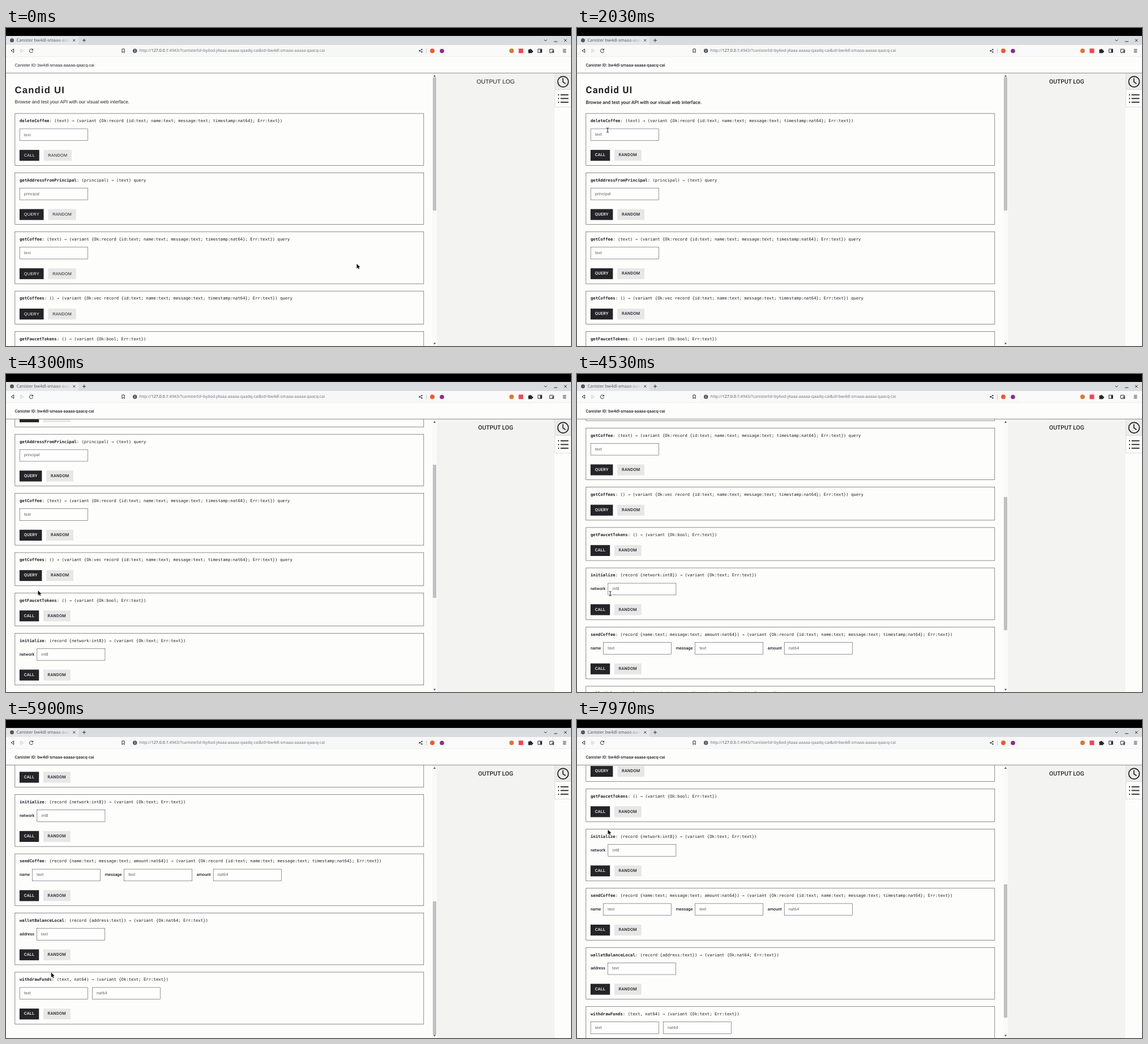
Write an HTML page that moves like this. It is 998 px wide and 561 px high and loops after 8 s.

```html
<!DOCTYPE html>
<html lang="en">
<head>
<meta charset="utf-8">
<title>Candid UI</title>
<style>
html, body { margin: 0; width: 100%; height: 100%; overflow: hidden; background: #fdfdfc; }
#stage { position: relative; width: 998px; height: 561px; overflow: hidden; background: #fdfdfc; text-rendering: geometricPrecision; }
#stage div, #stage svg, .t { position: absolute; box-sizing: border-box; }
.t { white-space: pre; }
.black { left: 0; top: 0; width: 998px; height: 14px; background: #000; }
.tabs { left: 0; top: 14px; width: 998px; height: 16px; background: #d9dcdf; }
.tab { left: 1px; top: 1px; width: 127px; height: 15px; background: #e4e6e8; border-radius: 2px 2px 0 0; }
.bar { left: 0; top: 30px; width: 998px; height: 21px; background: #fafafa; border-bottom: 1px solid #ececec; }
.field { left: 217px; top: 2px; width: 564px; height: 17px; background: #f6f7f7; border-radius: 2px; }
.chrome { font: 400 7.15px/12px "Noto Sans", sans-serif; color: #73757a; }
.chrome b { font-weight: 400; color: #4a4c50; }
.tabname { left: 18.5px; top: 15.5px; width: 96px; overflow: hidden; font-size: 7.5px; color: #5a5c60;
  -webkit-mask: linear-gradient(90deg, #000 72%, transparent); mask: linear-gradient(90deg, #000 72%, transparent); }

/* the web page is laid out on a 1920 x 1080 screen and scaled to the stage */
#web {
  --ui: "Liberation Sans", Arial, sans-serif;
  left: 0; top: 0; width: 1920px; height: 1080px;
  transform: scale(.51979, .51944); transform-origin: 0 0;
  color: #222126; font: 500 14px/20px var(--ui);
}
#web.loaded { --ui: Roboto, sans-serif; }
.head { left: 0; top: 98px; width: 1920px; height: 56px; background: #fdfdfc; border-bottom: 1px solid #29252a; }
#view { left: 0; top: 154px; width: 1449px; height: 926px; overflow: hidden; }
#page { left: 0; width: 1449px; height: 2040px; }
.title { left: 30px; top: 188px; font-weight: 700; font-size: 32px; line-height: 46px; letter-spacing: 2.3px; }
.sub { left: 30px; top: 243px; font-size: 16px; }
.panel { left: 30px; width: 1390px; border: 1px solid #29252a; }
.sig { left: 15px; top: 15px; font: 400 14px/20px "DejaVu Sans Mono", monospace; }
.input { top: 51px; width: 232px; height: 41px; border: 1px solid #38353a; background: #fefefe; padding: 0 14px; line-height: 39px; color: #66666b; font-weight: 400; }
#stage .row { left: 15px; bottom: 15px; display: flex; gap: 15px; }
.btn { height: 37px; padding: 0 15px; line-height: 37px; letter-spacing: .5px; background: #e7e7e7; }
.btn.go { background: #242428; color: #fbfbfb; }
.log { left: 1464px; top: 154px; width: 400px; height: 926px; background: #f3f3f1; text-align: center; font-size: 20px; line-height: 56px; }

.track { left: 753px; top: 80px; width: 8px; height: 481px; background: #fafafa; }
#thumb { left: 754px; top: 87px; width: 6px; height: 235px; background: #c0c0c0; }
.clock { left: 969px; top: 80px; width: 29px; height: 29px; background: #ebebea; border-bottom: 1px solid #d8d8d6; }
.list { left: 969px; top: 109px; width: 29px; height: 31px; border-bottom: 1px solid #dededc; }
.side { left: 969px; top: 80px; width: 1px; height: 60px; background: #dededc; }
#icons { left: 0; top: 0; }
#cursor { left: -6px; top: -6px; }
</style>
</head>
<body>
<div id="stage">
  <div class="black"></div>
  <div class="tabs"><div class="tab"></div></div>
  <div class="bar"><div class="field"></div></div>
  <span class="t chrome tabname">Canister bw4dl-smaaa-aaaaa-qaacq-cai</span>
  <span class="t chrome" style="left:235.5px;top:34px">http://<b>127.0.0.1</b>:4943/?canisterId=by6od-j4aaa-aaaaa-qaadq-cai&amp;id=bw4dl-smaaa-aaaaa-qaacq-cai</span>
  <div id="web">
    <div class="head"><span class="t" style="left:30px;top:18px">Canister ID: bw4dl-smaaa-aaaaa-qaacq-cai</span></div>
    <div id="view"><div id="page">
      <span class="t title">Candid UI</span>
      <span class="t sub">Browse and test your API with our visual web interface.</span>
    </div></div>
    <div class="log">OUTPUT LOG</div>
  </div>
  <div class="track"></div>
  <div id="thumb"></div>
  <div class="clock"></div>
  <div class="list"></div>
  <div class="side"></div>
  <svg id="icons" width="998" height="561" fill="none" stroke="#2c2d31">
    <circle cx="10.5" cy="21.8" r="3.5" fill="#55565c" stroke="none"/>
    <path d="M118.3 19.7l4 4m0-4l-4 4M135 21.8h6m-3-3v6"/>
    <path d="M950.5 20.5l2.5 2.5 2.5-2.5M968 24h6M985.8 19.5l4.6 4.6m0-4.6l-4.6 4.6"/>
    <path d="M13.7 37v6.2L9 40.1z"/>
    <path d="M26 37v6.2l4.7-3.1z" stroke="#c6c7ca"/>
    <path d="M47 38.2a3.2 3.2 0 1 0 .6 3M47.6 36.6v2.4h-2.4"/>
    <path d="M205 37h4.2v6.4l-2.1-1.8-2.1 1.8z"/>
    <circle cx="227.7" cy="40.2" r="3.7" fill="#55565b" stroke="none"/>
    <path d="M227.7 39.7v2.6M227.7 38v1" stroke="#fff"/>
    <path d="M734.5 38l-4 2.2 4 2.2" stroke-width=".8"/>
    <g fill="#3c3d41" stroke="none"><circle cx="734.5" cy="38" r="1.2"/><circle cx="730.5" cy="40.2" r="1.2"/><circle cx="734.5" cy="42.4" r="1.2"/></g>
    <path d="M742.5 36v9" stroke="#c8c9cc"/>
    <g stroke="none">
      <circle cx="753" cy="40.2" r="4" fill="#ee5a30"/>
      <circle cx="770" cy="40.5" r="3.8" fill="#8b2f83"/>
      <circle cx="893" cy="40.3" r="4" fill="#d87932"/>
      <rect x="905.5" y="36.3" width="8" height="8" fill="#ef4652"/>
      <path d="M922.5 38h2.2a1.3 1.3 0 1 1 2.6 0h2v2.2a1.3 1.3 0 1 1 0 2.4v1.7h-6.8z" fill="#26272b"/>
      <path d="M943.5 37.5h3v5.5h-3z" fill="#26272b"/>
    </g>
    <path d="M939.7 37.2h6.6v6h-6.6zM960.5 37.4h6v1.4h1v4.6h-7zM964.5 40.2h3v1.6h-3z"/>
    <path d="M983.7 37.8h5.6m-5.6 2.4h5.6m-5.6 2.4h5.6"/>
    <g stroke="none" fill="#55565a"><path d="M754.8 86l2.2-3 2.2 3zM754.8 555.5l2.2 3 2.2-3z"/></g>
    <g stroke="#1f1f22" stroke-width="1.7">
      <circle cx="984" cy="94.7" r="9.4"/>
      <path d="M983.7 88.5v6.6l4.6 3.2M979.5 117.8h14m-14 6.5h14m-14 6.5h14M975 117.8h2m-2 6.5h2m-2 6.5h2"/>
    </g>
  </svg>
  <svg id="cursor" width="20" height="24">
    <path id="arrow" d="M6 6v8.4l2-1.8 1.4 3 1.4-.7-1.4-2.9h2.7z" fill="#111" stroke="#fff" stroke-width=".7" paint-order="stroke"/>
    <path id="beam" d="M4 2q2 0 2 1.2Q6 2 8 2M6 3v6M4 10q2 0 2-1.2Q6 10 8 10" fill="none" stroke="#222"/>
  </svg>
</div>
<script>
const $ = id => document.getElementById(id);
const LOOP = 8000, FONT_READY = 330, SCALE = .5195, VIEW_TOP = 154;

const coffee = 'record {id:text; name:text; message:text; timestamp:nat64}';
const result = ok => `(variant {Ok:${ok}; Err:text})`;
// name, arguments, return type, button, inputs as [x, placeholder, label x, label]
const methods = [
  ['deleteCoffee', '(text)', result(coffee), 'CALL', [[46, 'text']]],
  ['getAddressFromPrincipal', '(principal)', '(text) query', 'QUERY', [[46, 'principal']]],
  ['getCoffee', '(text)', result(coffee) + ' query', 'QUERY', [[46, 'text']]],
  ['getCoffees', '()', result('vec ' + coffee) + ' query', 'QUERY', []],
  ['getFaucetTokens', '()', result('bool'), 'CALL', []],
  ['initialize', '(record {network:int8})', result('text'), 'CALL', [[105, 'int8', 46, 'network']]],
  ['sendCoffee', '(record {name:text; message:text; amount:nat64})', result(coffee), 'CALL',
    [[89, 'text', 46, 'name'], [401, 'text', 336, 'message'], [704, 'nat64', 648, 'amount']]],
  ['walletBalanceLocal', '(record {address:text})', result('nat64'), 'CALL', [[104, 'text', 46, 'address']]],
  ['withdrawFunds', '(text, nat64)', result('text'), 'CALL', [[46, 'text'], [293, 'nat64']]]
];

const fields = [];
let y = 290, html = '';
for (const [name, args, ret, action, inputs] of methods) {
  const height = inputs.length ? 177 : 113;
  html += `<div class="panel" style="top:${y}px;height:${height}px">
    <span class="t sig"><b>${name}</b>: ${args} → ${ret}</span>`;
  for (const [x, hint, labelX, label] of inputs) {
    if (label) html += `<span class="t" style="left:${labelX - 31}px;top:61px">${label}</span>`;
    html += `<div class="input" style="left:${x - 31}px">${hint}</div>`;
    fields.push({ x, y: y + 52 });
  }
  html += `<div class="row"><span class="btn go">${action}</span><span class="btn">RANDOM</span></div></div>`;
  y += height + 24;
}
$('page').insertAdjacentHTML('beforeend', html);

// keys: [time, ...values]; scroll in page pixels, mouse in stage pixels
const scrollKeys = [[3850, 0], [4300, 286], [4870, 836], [4990, 914], [7420, 914], [7600, 797]];
const mouseKeys = [
  [350, 619.5, 416], [1000, 300, 300], [1600, 22, 200], [2030, 54, 180], [2260, 88, 215],
  [2500, 68, 257], [2630, 80, 256], [2800, 80, 256], [3020, 103, 330], [3280, 66, 420],
  [3500, 40, 384], [3670, 50, 378], [4300, 56.5, 382], [4870, 62, 396], [5300, 62, 396],
  [5560, 140, 370], [5800, 100, 448], [6100, 34, 440], [6300, 40, 470], [6600, 70, 430],
  [6930, 46, 345], [7130, 43.5, 271.5], [7400, 40, 240], [7800, 47, 208], [7970, 54.5, 193.5]
];

function sample(keys, t, ease) {
  const i = keys.findIndex(k => k[0] > t);
  if (i === 0) return keys[0].slice(1);
  if (i < 0) return keys[keys.length - 1].slice(1);
  const a = keys[i - 1], b = keys[i];
  const p = ease((t - a[0]) / (b[0] - a[0]));
  return a.slice(1).map((v, j) => v + (b[j + 1] - v) * p);
}
const linear = p => p;
const soft = p => p * (.6 + p * (1.2 - .8 * p));

function draw(now) {
  const t = now % LOOP;
  const scroll = Math.round(sample(scrollKeys, t, linear)[0]);
  const [mx, my] = sample(mouseKeys, t, soft);
  $('web').classList.toggle('loaded', t >= FONT_READY);
  $('page').style.top = -VIEW_TOP - scroll + 'px';
  $('thumb').style.top = 87 + scroll * .2545 + 'px';
  $('cursor').style.transform = `translate(${mx}px, ${my}px)`;
  const px = mx / SCALE, py = my / SCALE + scroll;
  const typing = fields.some(f => px >= f.x && px <= f.x + 232 && py >= f.y && py <= f.y + 41);
  $('arrow').style.display = typing ? 'none' : '';
  $('beam').style.display = typing ? '' : 'none';
}

const start = performance.now();
function tick() {
  draw(performance.now() - start);
  requestAnimationFrame(tick);
}
tick();
</script>
</body>
</html>
```
